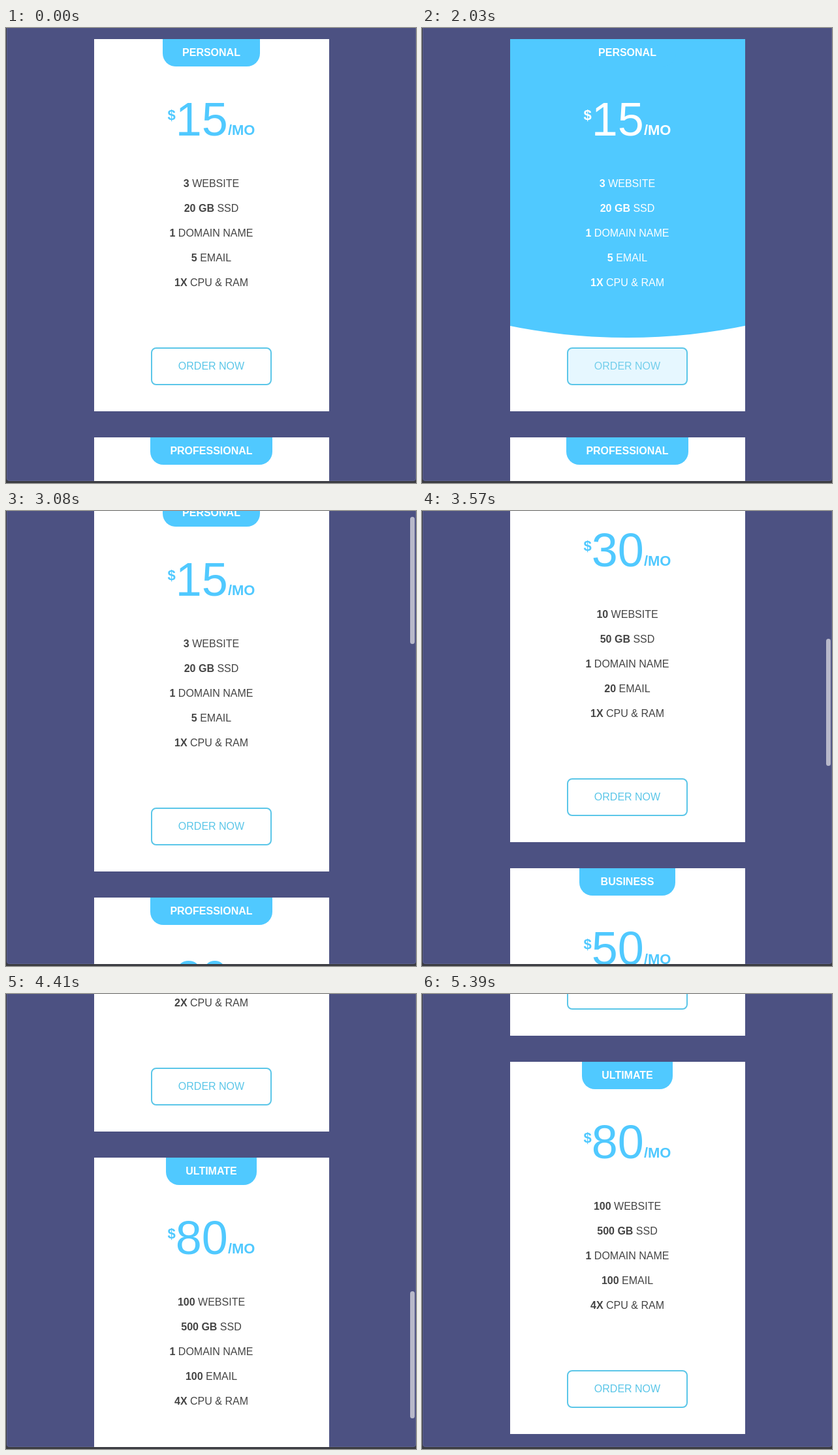
Recreate the animation shown at these times as an HTML page. Size 628 px wide and 698 px high, loop 5.46 s.

```html
<!DOCTYPE html>
<html lang="en">
<head>
<meta charset="utf-8">
<title>Hosting plans</title>
<style>
  html, body { margin: 0; width: 100%; height: 100%; overflow: hidden; background: #3b3c42; }
  #stage { display: block; width: 628px; height: 698px; }
  text { font: 16px "Liberation Sans", Arial, sans-serif; text-anchor: middle; }
  .title, .unit, b, .strong { font-weight: bold; }
  .title { fill: #fff; }
  .unit { font-size: 22px; }
  .amount { font-size: 72px; }
</style>
</head>
<body>
<svg id="stage" viewBox="0 0 628 698">
  <defs><clipPath id="window"><path d="M1 0H628V691Q628 695 624 695H5Q1 695 1 691Z"/></clipPath></defs>
  <g clip-path="url(#window)">
    <rect width="628" height="698" fill="#4c5182"/>
    <path d="M1.5 0V690Q1.5 694.5 6 694.5H623Q627.5 694.5 627.5 690V0" fill="none" stroke="#686c95" stroke-opacity=".6"/>
    <g id="page"></g>
    <rect id="thumb" x="619" width="7" height="195" rx="3.5" fill="#b7b8ca"/>
  </g>
</svg>
<script>
const LOOP = 5460, STEP = 70, FADE = 500;
const PITCH = 611, MID = 179.5, SCROLL_END = 1746;
const BLUE = [80, 201, 255], BUTTON = [91, 198, 232], DARK = [68, 68, 68], WHITE = [255, 255, 255];

// title, badge width, price, sites, disk, mailboxes, power
const plans = [
  ["PERSONAL", 149, 15, 3, 20, 5, "1X"],
  ["PROFESSIONAL", 187, 30, 10, 50, 20, "1X"],
  ["BUSINESS", 147, 50, 30, 150, 40, "2X"],
  ["ULTIMATE", 139, 80, 100, 500, 100, "4X"]
];

const hovers = { card: [1411, 2530], button: [1966, 2500] };

// time, scroll offset
const scrollKeys = [
  [2970, 0], [3080, 35], [3250, 220], [3500, 590], [3780, 980], [4060, 1292],
  [4350, 1550], [4600, 1730], [4720, 1767], [4830, 1761], [5000, 1750], [5200, SCROLL_END]
];

const clamp = (v, lo = 0, hi = 1) => Math.min(hi, Math.max(lo, v));
const mix = (a, b, p) => a + (b - a) * p;
const rgb = (a, b, p) => `rgb(${a.map((v, i) => Math.round(mix(v, b[i], p)))})`;
const $ = id => document.getElementById(id);

// The CSS "ease" curve
function ease(x) {
  if (x <= 0 || x >= 1) return clamp(x);
  let lo = 0, hi = 1, s = x;
  for (let i = 0; i < 24; i++) {
    s = (lo + hi) / 2;
    if (.75 * s * (1 - s) + s ** 3 < x) lo = s; else hi = s;
  }
  return .3 * s * (1 - s) ** 2 + 3 * s * s * (1 - s) + s ** 3;
}

const hover = (t, [on, off]) => t < off ? ease((t - on) / FADE) : 1 - ease((t - off) / FADE);

function slope(i) {
  const k = scrollKeys;
  if (i === 0 || i === k.length - 1) return 0;
  const a = (k[i][1] - k[i - 1][1]) / (k[i][0] - k[i - 1][0]);
  const b = (k[i + 1][1] - k[i][1]) / (k[i + 1][0] - k[i][0]);
  return a * b <= 0 ? 0 : 2 * a * b / (a + b);
}

function scrollAt(t) {
  const k = scrollKeys, last = k.length - 1;
  if (t <= k[0][0]) return 0;
  if (t >= k[last][0]) return SCROLL_END;
  const i = k.findIndex(p => p[0] > t) - 1;
  const d = k[i + 1][0] - k[i][0], u = (t - k[i][0]) / d;
  const s = u * u * (3 - 2 * u);
  return mix(k[i][1], k[i + 1][1], s)
    + d * u * (1 - u) * ((1 - u) * slope(i) - u * slope(i + 1));
}

function cardMarkup([title, width, price, sites, disk, mail, power], n) {
  const x = MID - width / 2;
  const rows = [[sites, "WEBSITE"], [disk + " GB", "SSD"], [1, "DOMAIN NAME"], [mail, "EMAIL"], [power, "CPU &amp; RAM"]];
  const list = rows.map(([count, label], i) =>
    `<text x="${MID}" y="${227 + i * 38}"><tspan class="strong">${count}</tspan> ${label}</text>`).join("");
  return `<svg x="135" y="${17 + n * PITCH}" width="360" height="571">
    <rect width="360" height="571" fill="#fff"/>
    <path class="fill" fill="rgb(${BLUE})" opacity="0"/>
    <path d="M${x} 0h${width}v22a20 20 0 0 1-20 20h${40 - width}a20 20 0 0 1-20-20z" fill="rgb(${BLUE})"/>
    <text class="title" x="${MID}" y="26">${title}</text>
    <text class="price" x="${MID}" y="124" fill="rgb(${BLUE})"><tspan class="unit">$</tspan><tspan class="amount" dy="24">${price}</tspan><tspan class="unit" dy="-1">/MO</tspan></text>
    <g class="list" fill="rgb(${DARK})">${list}</g>
    <rect class="button" x="88" y="474" width="183" height="56" rx="7" fill="#fff" stroke="rgb(${BUTTON})" stroke-width="2"/>
    <text class="order" x="${MID}" y="507" fill="rgb(${BUTTON})">ORDER NOW</text>
  </svg>`;
}

$("page").innerHTML = plans.map(cardMarkup).join("");
const first = $("page").firstElementChild;
const [fill, price, list, button, order] =
  ["fill", "price", "list", "button", "order"].map(c => first.querySelector("." + c));

// The badge's backdrop grows into a wide, round-bottomed sheet
function sheet(p) {
  const w = mix(74.5, 495, p), h = mix(42, 458, p);
  const rx = mix(20, 495, p), ry = mix(28, 265, p);
  return `M${MID - w} 0H${MID + w}V${h - ry}a${rx} ${ry} 0 0 1 ${-rx} ${ry}H${MID - w + rx}a${rx} ${ry} 0 0 1 ${-rx} ${-ry}Z`;
}

function draw(t) {
  const p = hover(t, hovers.card), b = hover(t, hovers.button);
  fill.setAttribute("d", sheet(p));
  fill.setAttribute("opacity", p);
  price.setAttribute("fill", rgb(BLUE, WHITE, p));
  list.setAttribute("fill", rgb(DARK, WHITE, p));
  button.setAttribute("fill", rgb(WHITE, BLUE, b));
  order.setAttribute("fill", rgb(BUTTON, WHITE, b));

  const y = Math.round(scrollAt(t));
  $("page").setAttribute("transform", `translate(0 ${-y})`);
  $("thumb").setAttribute("y", Math.round(Math.min(498, 368 + .2856 * (y - 1292))));
  $("thumb").setAttribute("opacity", t < 2970 ? 0 : clamp((5320 - t) / 250));
}

const start = performance.now();
function tick() {
  const t = Math.max(0, performance.now() - start) % LOOP;
  draw(Math.floor(t / STEP) * STEP);
  requestAnimationFrame(tick);
}
tick();
</script>
</body>
</html>
```
